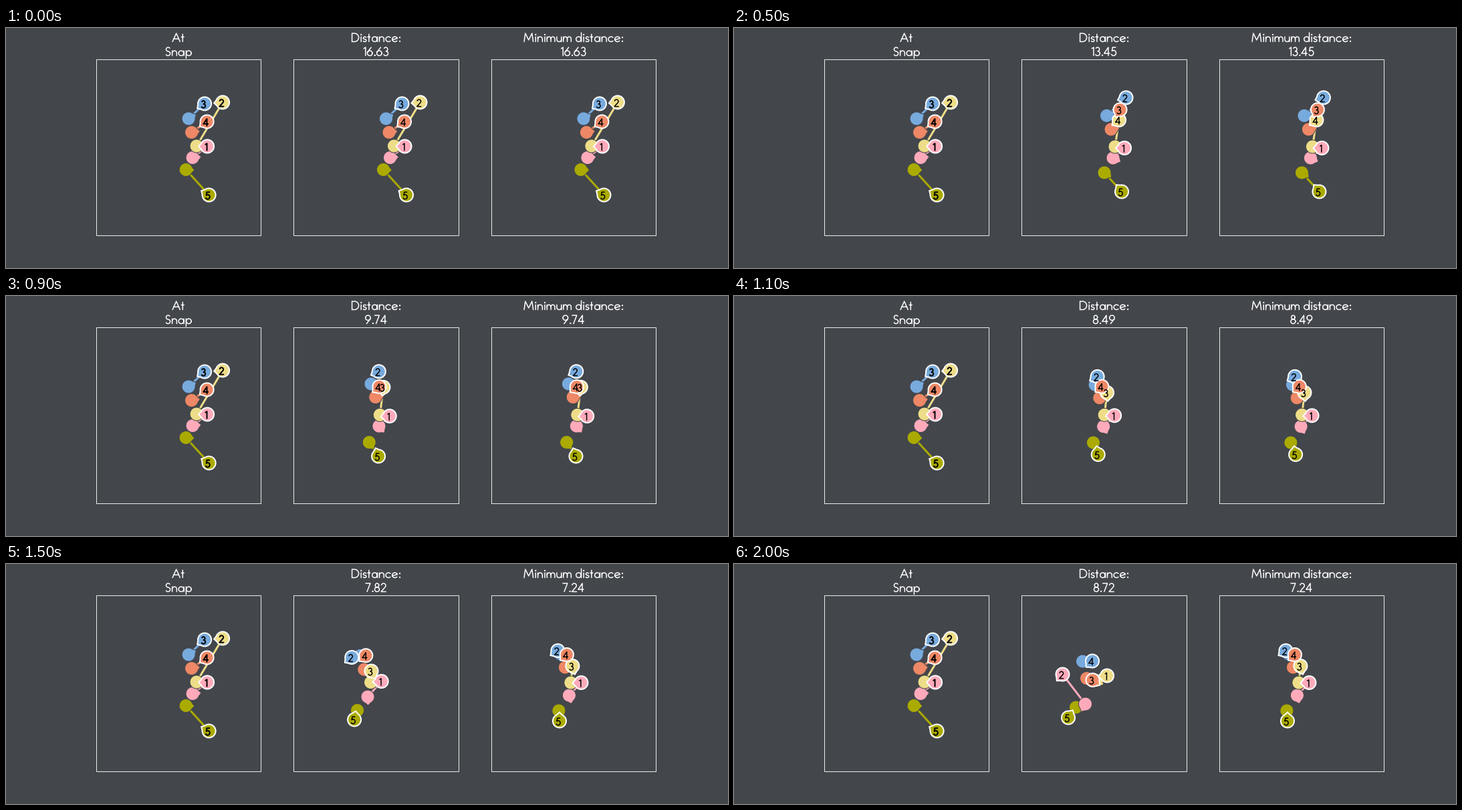
Write a matplotlib script that moves like this. It is 1080x360 px and loops after 2500 ms.

```python
from itertools import permutations

import matplotlib.pyplot as plt
import numpy as np
from matplotlib.animation import FuncAnimation

plt.rcParams["toolbar"] = "None"
plt.rcParams["path.simplify"] = False

W, H, DPI = 1080, 360, 100
PX = 72 / DPI
BG = "#43464b"
STEPS, HOLD = 21, 4  # moving steps, then ticks spent on the last pose
GAP, SIDE = 295.4, 246.4  # panel spacing and width

# Each path is a cubic through four waypoints; facing turns evenly from start to end.
WAY_TIMES = [0, 5, 13, 20]
COLORS = ["#aaaa00", "#ffaabb", "#eedd88", "#77aadd", "#ee8866"]
DEFENDERS = [
    [(564.5, 212.5), (554, 217), (531.5, 220), (511.5, 215)],
    [(574.5, 194.5), (567, 195), (547, 197), (525.5, 210)],
    [(580.5, 177), (570, 178), (549.5, 178), (541.5, 174.5)],
    [(568.5, 136), (557.5, 131.5), (534.5, 135), (521.5, 146)],
    [(573, 156.5), (564, 152), (541, 155), (527.5, 171.5)],
]
DEF_TURN = [(-3, -120), (5, -118), (0, -30), (30, 10), (8, 8)]
RUNNERS = [
    [(596.5, 177.5), (584, 180), (565, 178), (558, 167.5)],
    [(619.5, 111.5), (586.5, 104.5), (530, 130), (491.5, 165.5)],
    [(592.5, 113.5), (577.5, 122.5), (552, 153), (536.5, 174)],
    [(596, 140.5), (576, 138), (543.5, 136), (536, 145.5)],
    [(599, 250.5), (580, 245.5), (532.5, 235.5), (500, 230.5)],
]
RUN_TURN = [(180, 185), (185, 228), (213, 325), (214, 225), (151, 58)]


def travel(paths):
    """Positions as (step, player, xy)."""
    ways = np.swapaxes(paths, 0, 1).reshape(4, -1)
    curve = np.polyfit(WAY_TIMES, ways, 3)
    t = np.arange(STEPS)[:, None]
    return (t ** np.arange(3, -1, -1) @ curve).reshape(STEPS, -1, 2)


def match(d, r):
    """Pairing of defenders to runners with the least total distance."""
    gap = np.linalg.norm(d[:, None] - r[None], axis=2)
    return min(permutations(range(5)), key=lambda p: gap[range(5), p].sum())


defs, runs = travel(DEFENDERS), travel(RUNNERS)
def_dir = np.linspace(*np.transpose(DEF_TURN), STEPS)
run_dir = np.linspace(*np.transpose(RUN_TURN), STEPS)
pairs = [match(d, r) for d, r in zip(defs, runs)]
dist = np.interp(range(STEPS), [0, 2, 5, 9, 13, 17, 20],
                 [16.63, 15.51, 13.45, 9.74, 7.24, 8.39, 8.72])


# --- geometric stroke lettering, baseline at 0 and y upwards ---
CAP, LOW = 12.5, 7.3


def arc(cx, cy, rx, ry, a=0, b=360):
    t = np.radians(np.linspace(a, b, 25))
    return list(zip(cx + rx * np.cos(t), cy + ry * np.sin(t)))


def stem(x, top=LOW, foot=0):
    return [(x, foot), (x, top)]


def dot(y):
    return arc(2, y, 0.35, 0.35)


def bowl(x):
    return arc(x, 3.7, 3.8, 3.7)


def arch(x, w):
    return arc(x + w / 2, 4.2, w / 2, 3.1, 180, 0) + [(x + w, 0)]


def ess(w, h):
    top = arc(4.9 * w, 9.5 * h, 3 * w, 3 * h, 35, 265)
    return top + arc(4.7 * w, 3.2 * h, 3.3 * w, 3.2 * h, 85, -150)


def spin(strokes, height):
    """Half turn, as u from n and 9 from 6."""
    return [[(9.6 - x, height - y) for x, y in s] for s in strokes]


GLYPHS = {
    "A": [[(0.6, 0), (6.2, CAP), (11.8, 0)], [(2.6, 4.2), (9.8, 4.2)]],
    "D": [stem(1.4, CAP) + arc(5, CAP / 2, 6.4, CAP / 2, 90, -90) + [(1.4, 0)]],
    "M": [[(1, 0), (2.8, CAP), (7.8, 2.5), (12.8, CAP), (14.6, 0)]],
    "S": [ess(1, 1)],
    "a": [bowl(5), stem(9)],
    "c": [arc(5.2, 3.7, 4, 3.7, 45, 315)],
    "d": [bowl(5), stem(9, 13.6)],
    "e": [[(1.4, 2.8)] + arc(5.2, 3.7, 4, 3.7, 20, 318)],
    "i": [stem(2), dot(10.6)],
    "m": [stem(1.4), arch(1.4, 5.8), arch(7.2, 5.8)],
    "n": [stem(1.4), arch(1.4, 6.8)],
    "p": [bowl(5.8), stem(1.8, LOW, -4.2)],
    "s": [ess(0.72, 0.58)],
    "t": [stem(2.4, 11.2), [(0.4, 7), (4.4, 7)]],
    ".": [dot(0.5)],
    ":": [dot(0.6), dot(6.3)],
    "0": [arc(4.9, CAP / 2, 4, CAP / 2)],
    "1": [[(1.2, 10.7), (3.8, CAP), (3.8, 0)]],
    "2": [arc(4.6, 9.1, 3.3, 3.3, 165, -38) + [(1, 0), (8.1, 0)]],
    "3": [arc(4.3, 9.6, 2.8, 2.9, 150, -85) + arc(4.3, 3.4, 3.5, 3.4, 80, -150)],
    "4": [stem(7, CAP)[::1] + [(0.8, 3.4), (9, 3.4)]],
    "5": [[(7.5, CAP), (2.8, CAP), (2, 6.8)] + arc(4.3, 4, 3.7, 4, 125, -150)],
    "6": [bowl(4.8), [(6.9, CAP), (1.6, 5.7)]],
    "7": [[(0.6, CAP), (7.5, CAP), (2.7, 0)]],
    "8": [arc(4.6, 9.6, 2.7, 2.9), arc(4.6, 3.4, 3.5, 3.4)],
}
GLYPHS["u"] = spin(GLYPHS["n"], LOW)
GLYPHS["9"] = spin(GLYPHS["6"], CAP)


def advance(c):
    if c == " ":
        return 4.6
    return max(x for s in GLYPHS[c] for x, _ in s) + 1.6


fig = plt.figure(figsize=(W / DPI, H / DPI), dpi=DPI, facecolor=BG)
ax = fig.add_axes([0, 0, 1, 1])


def write(text, cx, base, size=1.0, color="white", weight=1.5):
    """Centred line of text."""
    x = cx - size * sum(map(advance, text)) / 2
    pts = []
    for c in text:
        for s in GLYPHS.get(c, []):
            pts += [(x + size * px, base - size * py) for px, py in s]
            pts.append((np.nan, np.nan))
        x += size * advance(c)
    ax.plot(*zip(*pts), color=color, lw=weight * PX, zorder=4,
            solid_capstyle="round", solid_joinstyle="round")


def marker(pos, angle, color, edge, lw, z):
    """Disc with a small beak showing the facing direction."""
    t = np.radians(angle + np.append(np.linspace(25, 335, 60), 0))
    r = np.append(np.full(60, 10), 13)
    ax.fill(pos[0] + r * np.cos(t), pos[1] - r * np.sin(t), fc=color, ec=edge,
            lw=lw * PX, joinstyle="miter", zorder=z)


def panel(col, k, title, weight=1.5):
    shift = GAP * (col - 1)
    left = 430.4 + shift
    ax.add_patch(plt.Rectangle((left, 47), SIDE, 264, fill=False,
                               ec="white", lw=0.9 * PX, zorder=0))
    for line, base in zip(title, (20.5, 41.5)):
        write(line, left + SIDE / 2, base)

    d, r = defs[k] + (shift, 0), runs[k] + (shift, 0)
    for i, (j, color) in enumerate(zip(pairs[k], COLORS)):
        ax.plot(*zip(d[i], r[j]), color=color, lw=3 * PX, zorder=1)
        marker(d[i], def_dir[k, i], color, BG, 1, 2)
        marker(r[j], run_dir[k, j], color, "white", 2, 3)
    for j, (x, y) in enumerate(r):
        write(str(j + 1), x - 1.5, y + 6.2, 0.84, "black", weight)


def draw(frame):
    k = min(frame, STEPS - 1)
    best = int(np.argmin(dist[:k + 1]))
    ax.cla()
    ax.set_xlim(0, W)
    ax.set_ylim(H, 0)
    ax.axis("off")
    panel(0, 0, ("At", "Snap"), 2.0)
    panel(1, k, ("Distance:", f"{dist[k]:.2f}"))
    panel(2, best, ("Minimum distance:", f"{dist[best]:.2f}"))
    return []


anim = FuncAnimation(fig, draw, frames=STEPS + HOLD, interval=100,
                     init_func=lambda: [], repeat=True, cache_frame_data=False)
plt.show()
```
